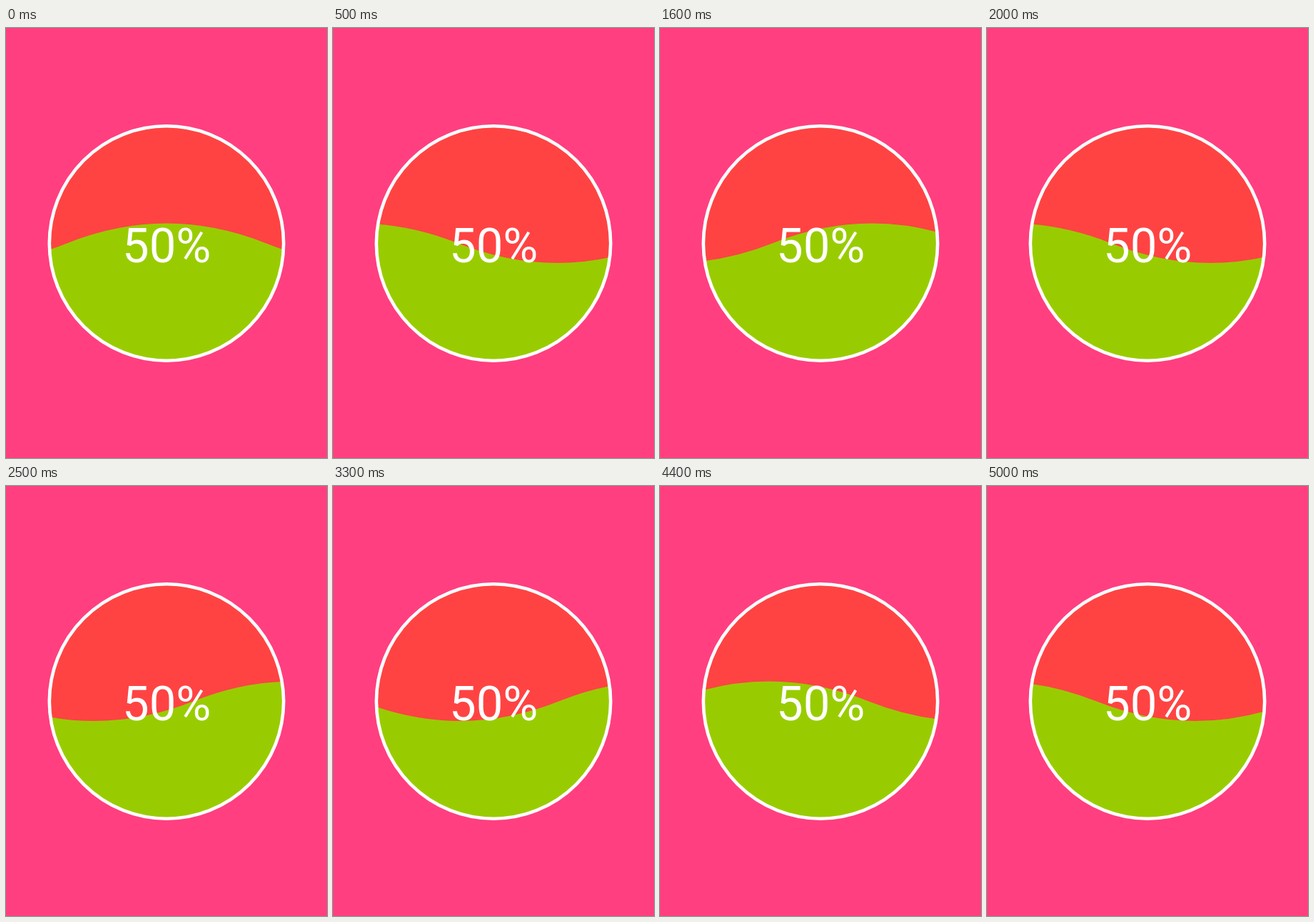
These frames come from a looping animation (450x602 px, 5.1 s). An HTML page with a canvas:

```html
<!DOCTYPE html>
<html lang="en">
<head>
<meta charset="utf-8">
<title>Wave progress</title>
<style>
  html, body { margin: 0; width: 100%; height: 100%; overflow: hidden; background: #ff3f80; }
  canvas { display: block; }
</style>
</head>
<body>
<canvas id="stage" width="450" height="602"></canvas>
<script>
const ctx = document.getElementById('stage').getContext('2d');
const LOOP = 5100, STEP = 100;
const CENTER = { x: 225, y: 301.5 }, RADIUS = 164.2;
const LEVEL = 301.3, AMPLITUDE = 27.7, HALF_WAVE = 278, WAVE = HALF_WAVE * 2;

// Unwrapped crest position over time: [ms, px]. The speed varies slightly.
const travel = [
  [0, 225], [1000, 959], [1600, 1409], [2500, 2070],
  [3300, 2680], [4400, 3489], [5000, 3906]
];

function crestAt(time) {
  const i = Math.max(1, travel.findIndex(([ms]) => ms >= time));
  const [t0, x0] = travel[i - 1];
  const [t1, x1] = travel[i];
  return x0 + (x1 - x0) * (time - t0) / (t1 - t0);
}

function circle() {
  ctx.beginPath();
  ctx.arc(CENTER.x, CENTER.y, RADIUS, 0, Math.PI * 2);
}

function drawWater(crest) {
  let x = (crest - HALF_WAVE / 2) % WAVE - WAVE;
  let direction = -1;
  ctx.beginPath();
  ctx.moveTo(x, LEVEL);
  while (x < 450) {
    ctx.quadraticCurveTo(x + HALF_WAVE / 2, LEVEL + direction * AMPLITUDE * 2, x + HALF_WAVE, LEVEL);
    x += HALF_WAVE;
    direction = -direction;
  }
  ctx.lineTo(x, 602);
  ctx.lineTo(-WAVE, 602);
  ctx.fillStyle = '#99cc00';
  ctx.fill();
}

function draw(time) {
  ctx.fillStyle = '#ff3f80';
  ctx.fillRect(0, 0, 450, 602);

  ctx.save();
  circle();
  ctx.clip();
  ctx.fillStyle = '#ff4343';
  ctx.fillRect(0, 0, 450, 602);
  drawWater(crestAt(time));
  ctx.restore();

  circle();
  ctx.strokeStyle = '#fff';
  ctx.lineWidth = 4.6;
  ctx.stroke();

  ctx.fillStyle = '#fff';
  ctx.font = '400 67px Roboto, sans-serif';
  ctx.textAlign = 'center';
  ctx.fillText('50%', 225.2, 327.5);
}

const start = performance.now();
function frame() {
  const time = (performance.now() - start) % LOOP;
  draw(Math.floor(time / STEP) * STEP);
  requestAnimationFrame(frame);
}
frame();
</script>
</body>
</html>
```
